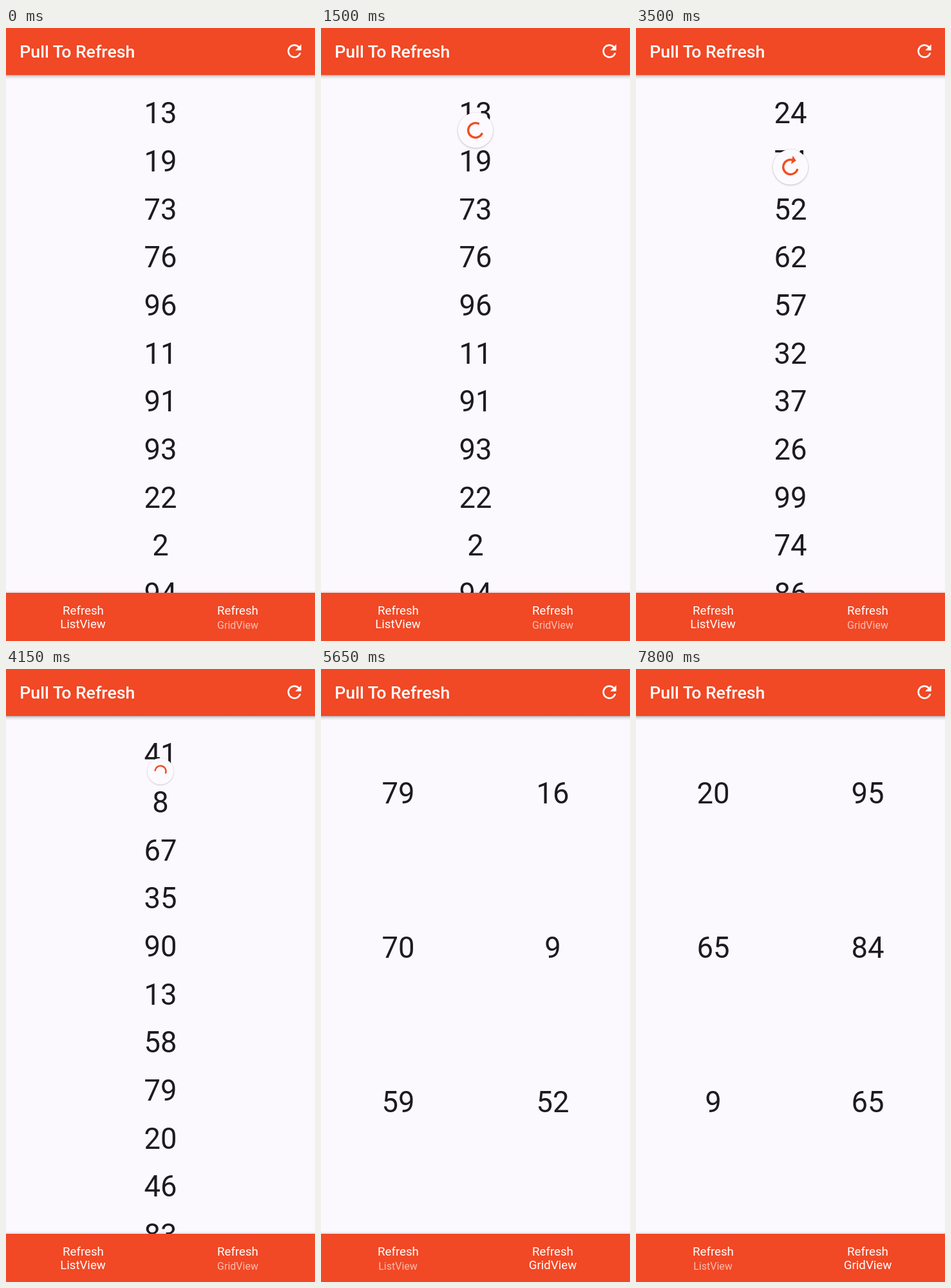
An HTML page for the animation above (8 s loop, 480 by 953 pixels).

```html
<!DOCTYPE html>
<html lang="en">
<head>
<meta charset="utf-8">
<title>Pull To Refresh</title>
<style>
  html, body { margin: 0; width: 100%; height: 100%; overflow: hidden; background: #fbf9fd; }
  svg { display: block; width: 100vw; height: 100vh; }
  text { font-family: Roboto, sans-serif; text-anchor: middle; }
  #numbers text { font-size: 45.33px; fill: #1d1b20; }
  .bar { fill: #f14825; }
  .nav { font-size: 18.67px; fill: #fff; }
  .title { font-size: 26.67px; font-weight: 500; fill: #fff; text-anchor: start; }
  .arc { fill: none; stroke: #f04e23; stroke-linecap: square; }
  #disc { fill: #fcfafe; filter: drop-shadow(0 1.6px 1.6px rgba(0,0,0,.2)) drop-shadow(0 0 1px rgba(0,0,0,.1)); }
</style>
</head>
<body>
<svg viewBox="0 0 480 953">
  <defs>
    <linearGradient id="fade" x2="0" y2="1">
      <stop offset="0" stop-color="#000" stop-opacity=".3"/>
      <stop offset=".4" stop-color="#000" stop-opacity=".1"/>
      <stop offset="1" stop-color="#000" stop-opacity="0"/>
    </linearGradient>
    <clipPath id="navClip"><rect y="878" width="480" height="75"/></clipPath>
  </defs>

  <g id="numbers"></g>
  <path id="loader" class="arc" stroke-width="5.33" transform="translate(240 475.5)"/>
  <g id="puller">
    <circle id="disc" r="27.33"/>
    <g id="mark">
      <path id="ring" class="arc" stroke-width="3.33"/>
      <path id="arrow" fill="#f04e23"/>
    </g>
  </g>

  <rect class="bar" width="480" height="73"/>
  <rect y="73" width="480" height="7" fill="url(#fade)"/>
  <text class="title" x="21.3" y="45.8">Pull To Refresh</text>
  <path fill="#fff" transform="translate(432 20) scale(1.3333)"
    d="M17.65 6.35C16.2 4.9 14.21 4 12 4c-4.42 0-7.99 3.58-7.99 8s3.57 8 7.99 8c3.73 0 6.84-2.55 7.73-6h-2.08c-.82 2.33-3.04 4-5.65 4-3.31 0-6-2.69-6-6s2.69-6 6-6c1.66 0 3.14.69 4.22 1.78L13 11h7V4l-2.35 2.35z"/>

  <rect y="875" width="480" height="3" fill="#000" opacity=".05"/>
  <rect class="bar" y="878" width="480" height="75"/>
  <circle id="splash" cx="360" cy="915.5" r="46.6" fill="#c8c8c8" clip-path="url(#navClip)"/>
  <text class="nav" x="120" y="911.6">Refresh</text>
  <text class="nav" x="360" y="911.6">Refresh</text>
  <g id="tabList"><text class="nav" y="-4.6">ListView</text></g>
  <g id="tabGrid"><text class="nav" y="-4.6">GridView</text></g>
</svg>

<script>
const LOOP = 8000, STEP = 50, DP = 4 / 3;
const TAP = 5020, TAB_SHOWN = 5100, GRID_READY = 5500;
const el = id => document.getElementById(id);
const clamp = (v, lo = 0, hi = 1) => Math.min(hi, Math.max(lo, v));

// Each pull: [time, extent] of the drag and snap back, then when loading is done.
const pulls = [
  { path: [[470, 0], [900, .73], [1090, 1.15], [1160, 1.2], [1310, 1]], done: 1800 },
  { path: [[2570, 0], [3350, 1.5], [3495, 1.5], [3630, 1]], done: 4100 },
  { path: [[6320, 0], [6750, .84], [6900, 1.15], [6980, 1.2], [7120, 1]], done: 7600 }
];

const screens = [
  { from: 0, cols: 1, values: [13, 19, 73, 76, 96, 11, 91, 93, 22, 2, 94] },
  { from: 1800, cols: 1, values: [24, 74, 52, 62, 57, 32, 37, 26, 99, 74, 86] },
  { from: 4100, cols: 1, values: [41, 8, 67, 35, 90, 13, 58, 79, 20, 46, 83] },
  { from: TAB_SHOWN, cols: 2, values: [] },
  { from: GRID_READY, cols: 2, values: [79, 16, 70, 9, 59, 52] },
  { from: 7600, cols: 2, values: [20, 95, 65, 84, 9, 65] }
];

// Cubic bezier (.4, 0, .2, 1)
function ease(x) {
  if (x <= 0 || x >= 1) return clamp(x);
  let lo = 0, hi = 1;
  for (let i = 0; i < 24; i++) {
    const s = (lo + hi) / 2, r = 1 - s;
    if (1.2 * r * r * s + .6 * r * s * s + s * s * s < x) lo = s; else hi = s;
  }
  return lo * lo * (3 - 2 * lo);
}

function along(path, t) {
  for (let i = 1; i < path.length; i++) {
    const [t0, v0] = path[i - 1], [t1, v1] = path[i];
    if (t < t1) return v0 + (v1 - v0) * clamp((t - t0) / (t1 - t0));
  }
  return path[path.length - 1][1];
}

// Start and end angle of the circular progress arc after `ms`.
function arcAngles(ms) {
  const c = ms / 1333 % 1;
  const head = ease(c * 2), tail = ease(c * 2 - 1);
  const start = -90 + tail * 270 + c * 90 + ms / 2222 * 360;
  const sweep = Math.max((head - tail) * 270, .1);
  return [start, start + sweep].map(a => a * Math.PI / 180);
}

const polar = (r, a) => `${(r * Math.cos(a)).toFixed(3)} ${(r * Math.sin(a)).toFixed(3)}`;
const arcPath = (r, [a, b]) =>
  `M${polar(r, a)}A${r} ${r} 0 ${b - a > Math.PI ? 1 : 0} 1 ${polar(r, b)}`;

function arrowPath(r, a, scale) {
  const s = 5 * DP * scale;
  const x = r * Math.cos(a) - s * Math.sin(a), y = r * Math.sin(a) + s * Math.cos(a);
  return `M${polar(r - s, a)}L${polar(r + s, a)}L${x} ${y}Z`;
}

let shown = null;
function drawNumbers(t) {
  const screen = screens.filter(s => s.from <= t).pop();
  if (screen === shown) return;
  shown = screen;
  el("numbers").replaceChildren(...screen.values.map((value, i) => {
    const node = document.createElementNS("http://www.w3.org/2000/svg", "text");
    const grid = screen.cols === 2;
    node.setAttribute("x", grid ? 120 + i % 2 * 240 : 240);
    node.setAttribute("y", grid ? 209.2 + (i >> 1) * 240 : 148.2 + i * 56 * DP);
    node.textContent = value;
    return node;
  }));
}

function drawPuller(t) {
  const pull = pulls.find(p => t > p.path[0][0] && t < p.done + 200);
  el("puller").style.display = pull ? "" : "none";
  if (!pull) return;
  const extent = along(pull.path, t);
  const loadStart = pull.path[pull.path.length - 1][0];
  const loading = t >= loadStart;
  const angles = arcAngles(extent / 2 * 666.5 + (loading ? t - loadStart : 0));
  const scale = 1 - clamp((t - pull.done) / 200);
  const y = 73 + 89 * DP * extent - 24.5 * DP;
  el("puller").setAttribute("transform", `translate(240 ${y}) scale(${scale})`);
  el("mark").setAttribute("opacity", clamp(extent));
  el("ring").setAttribute("d", arcPath(8.5 * DP, angles));
  el("arrow").setAttribute("d", loading ? "" : arrowPath(8.5 * DP, angles[1], clamp(extent)));
}

function drawTab(id, x, active) {
  el(id).setAttribute("transform", `translate(${x} 937.6) scale(${(12 + 2 * active) / 14})`);
  el(id).setAttribute("opacity", .64 + .36 * active);
}

function draw(t) {
  drawNumbers(t);
  drawPuller(t);
  const waiting = t >= TAB_SHOWN && t < GRID_READY;
  el("loader").setAttribute("d", waiting ? arcPath(18 * DP, arcAngles(t - TAP)) : "");
  const p = t < TAB_SHOWN ? 0 : ease((t - TAP) / 200);
  drawTab("tabList", 119.5, 1 - p);
  drawTab("tabGrid", 360, p);
  el("splash").setAttribute("opacity", t < TAB_SHOWN ? 0 : .4 * clamp(1 - (t - TAP - 7) / 200));
}

function tick() {
  const t = performance.now() % LOOP;
  draw(Math.floor(t / STEP) * STEP);
  requestAnimationFrame(tick);
}
draw(0);
requestAnimationFrame(tick);
</script>
</body>
</html>
```
